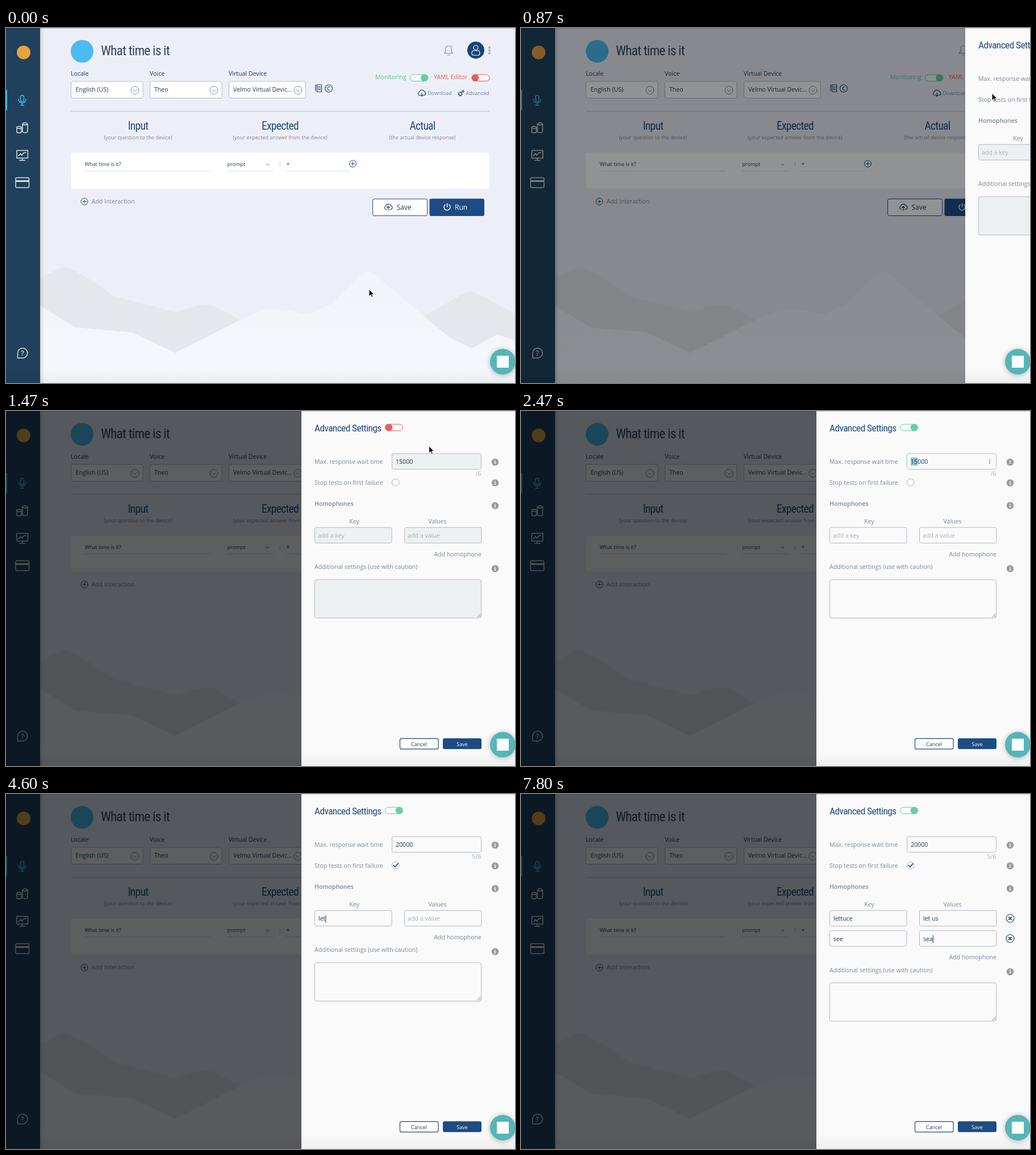
Recreate the animation shown at these times as an HTML page. Size 896x625 px, loop 8 s.

```html
<!DOCTYPE html>
<html lang="en">
<head>
<meta charset="utf-8">
<title>Advanced settings</title>
<style>
  html, body { margin: 0; width: 100%; height: 100%; overflow: hidden; background: #edeff8; }
  svg { display: block; width: 100%; height: 100%; }
  text { font: 10.6px "Open Sans", "Noto Sans", sans-serif; fill: #1c3a5e; white-space: pre; }
  .s { font-size: 9.05px; }
  .m { font-size: 12px; }
  .h { font-family: "Roboto Condensed", Roboto, sans-serif; font-stretch: 75%; letter-spacing: -.035em; font-size: 19.5px; fill: #1f4a7c; }
  .g { fill: #7c8896; }
  .p { fill: #a9b0b8; }
  .w { fill: #fff; }
  .c { text-anchor: middle; }
  .e { text-anchor: end; }
  .l { fill: none; stroke: #1f4a7c; stroke-width: 1.2; stroke-linecap: round; stroke-linejoin: round; }
  .side .l { stroke: #d7e0e8; stroke-width: 1.5; }
  .box { fill: #fff; stroke: #b4bcc6; }
  .field { fill: #fafafa; stroke: #b1b9c3; }
  .off .field { fill: #edf0f1; }
  .info text { font: bold 9px "Noto Serif", serif; fill: #fff; }
  .chat { filter: drop-shadow(0 1px 5px rgba(0, 0, 0, .28)); }
</style>
</head>
<body>
<svg viewBox="0 0 896 625">
  <defs>
    <linearGradient id="snow" x1="0" y1="0" x2="0" y2="1">
      <stop stop-color="#f0f4fb"/><stop offset="1" stop-color="#f5f9fc"/>
    </linearGradient>
    <linearGradient id="shade">
      <stop stop-opacity=".13"/><stop offset="1" stop-opacity="0"/>
    </linearGradient>
    <linearGradient id="floor" x1="0" y1="0" x2="0" y2="1">
      <stop stop-opacity="0"/><stop offset="1" stop-opacity=".05"/>
    </linearGradient>
    <g id="chev" class="l" style="stroke:#8390a0;stroke-width:1"><circle r="7"/><path d="M-3.5-1 0 2.3 3.5-1"/></g>
    <g id="plus" class="l" style="stroke-width:1"><circle r="6"/><path d="M-3 0H3M0-3V3"/></g>
    <path id="cloud" class="l" d="M-3 4.5H-4A3.2 3.2 0 0 1-4.5-1.5 4.7 4.7 0 0 1 4.2-2.2 3.4 3.4 0 0 1 4 4.5H3"/>
    <g id="info" class="info"><circle r="6.3" fill="#9a9c9f"/><text class="c" y="3.3">i</text></g>
    <g id="del" class="l"><circle r="7"/><path d="M-2-2 2 2M2-2-2 2" stroke-width="2"/></g>
  </defs>

  <rect width="896" height="625" fill="#edeff8"/>
  <path fill="#e5e7ec" d="M60 440 95 423Q103 419 111 423L140 438Q168 456 190 472L298 500 333 490Q355 485 366 489L412 514 300 590 60 540ZM735 507 805 468Q817 460 829 467L896 503V580H780Z"/>
  <path fill="url(#snow)" d="M60 489 122 527 222 536 298 572 412 514 450 498Q470 493 490 497L533 504 575 485 625 434Q636 424 649 434L735 507 781 545 820 564 860 542Q866 539 872 542L896 550V625H60Z"/>
  <rect x="60" width="7" height="625" fill="url(#shade)"/>

  <g class="side">
    <rect width="60" height="625" fill="#20405b"/>
    <circle cx="31" cy="43" r="12" fill="#e5a33f"/>
    <path fill="#42bdea" d="M0 109H2V145H0Z"/>
    <path class="l" style="stroke:#42bdea" d="M25.500 121.500a3 3 0 0 1 6 0v5a3 3 0 0 1-6 0ZM22 125.500a6.500 6.500 0 0 0 13 0M28.500 132V136M25.500 136H31.500"/>
    <path class="l" d="M29 168.500Q33.500 165 38 168.500V183Q33.500 186 29 183ZM29 169.500Q33.500 172 38 169.500M19 174.500Q23 172 27 174.500V183.500Q23 186 19 183.500ZM19 176Q23 178 27 176"/>
    <path class="l" d="M19 215.500H38.500V229H19ZM28.500 229V232.500M24 233H33.500M22 225 25.500 221 28 224 31 220 35 219"/>
    <rect class="l" x="17" y="263.500" width="23.500" height="17.500" rx="2"/>
    <path stroke="#d7e0e8" stroke-width="3" d="M17 269.500H40.500"/>
    <path class="l" d="M20.500 581V572A8.700 8.700 0 1 1 29.200 581Z"/>
    <text class="c" x="29" y="576.500" style="font-size:12px;font-weight:600;fill:#d7e0e8">?</text>
  </g>

  <circle cx="134" cy="41" r="20" fill="#4bbcf1"/>
  <text class="h" x="167" y="48" style="font-size:23.5px;fill:#34465c">What time is it</text>

  <path class="l" style="stroke:#8592a5" d="M771.500 44.500Q774 42 774 37Q774 31.500 779 31.500T784 37Q784 42 786.500 44.500ZM777 47.500H781"/>
  <circle cx="783.500" cy="33" r="3" fill="#d9cfd6"/>
  <circle cx="827" cy="39" r="15" fill="#174574"/>
  <g class="l" style="stroke:#fff"><circle cx="827" cy="34.500" r="4"/><rect x="820" y="40" width="14" height="8" rx="3.500"/></g>
  <g fill="none" stroke="#6d7f95"><circle cx="851" cy="34.500" r="1.400"/><circle cx="851" cy="39.500" r="1.400"/><circle cx="851" cy="44.500" r="1.400"/></g>

  <text x="114" y="84">Locale</text>
  <text x="253" y="84">Voice</text>
  <text x="392" y="84">Virtual Device</text>
  <rect class="box" x="114.500" y="94" width="126.500" height="29.500" rx="3"/>
  <rect class="box" x="253.500" y="94" width="126.500" height="29.500" rx="3"/>
  <rect class="box" x="392.500" y="94" width="135" height="29.500" rx="3"/>
  <text x="122.500" y="112">English (US)</text>
  <text x="261" y="112">Theo</text>
  <text x="400" y="112">Velmo Virtual Devic...</text>
  <use href="#chev" x="227" y="109.500"/><use href="#chev" x="366" y="109.500"/><use href="#chev" x="514" y="109.500"/>
  <path class="l" d="M547 100.500H545V110.500M547.500 100H555.500V112.500H547.500ZM549.500 103.500H553.500M549.500 106H553.500M549.500 108.500H553.500"/>
  <circle class="l" cx="568" cy="106.500" r="6.500"/><text class="s c" x="568" y="109.800" style="font-weight:600">C</text>

  <text x="650" y="90" style="fill:#5bc596">Monitoring</text>
  <rect x="711.500" y="82" width="31.500" height="11.500" rx="5.700" fill="#f4f8fa" stroke="#66cc9f"/><circle cx="736.500" cy="87.700" r="6.300" fill="#66cfa0"/>
  <text x="753" y="90" style="fill:#e0605f">YAML Editor</text>
  <rect x="820" y="82" width="31" height="11.500" rx="5.700" fill="#f8f4f6" stroke="#e0605f"/><circle cx="826" cy="87.700" r="6.300" fill="#e3625f"/>
  <use href="#cloud" x="732" y="114"/><path class="l" d="M732 114V120M729.800 118 732 120 734.200 118"/>
  <text class="s" x="742" y="118" style="fill:#6f8096">Download</text>
  <circle cx="799.500" cy="116" r="3" fill="none" stroke="#1f4a7c" stroke-width="2" stroke-dasharray="1.900 .5"/>
  <circle cx="804.500" cy="111.500" r="1.500" fill="none" stroke="#1f4a7c" stroke-width="1.300"/>
  <text class="s" x="809.500" y="118" style="fill:#6f8096">Advanced</text>
  <path stroke="#b9bfc9" d="M114 146.800H851"/>

  <text class="h c" x="232.500" y="179">Input</text>
  <text class="h c" x="482.500" y="179">Expected</text>
  <text class="h c" x="733" y="179">Actual</text>
  <text class="s g c" x="232.500" y="196">(your question to the device)</text>
  <text class="s g c" x="482.500" y="196">(your expected answer from the device)</text>
  <text class="s g c" x="733" y="196">(the actual device response)</text>
  <rect x="114.500" y="219.500" width="736.500" height="63" rx="4" fill="#fff"/>
  <text class="s" x="138.500" y="242.500">What time is it?</text>
  <text class="s" x="389.500" y="242.500">prompt</text>
  <text class="s" x="481" y="242.500">:</text>
  <text class="s" x="494" y="243.500">*</text>
  <path fill="none" stroke="#d5d9de" d="M138.500 251.800H360M389 251.800H471M493 251.800H605"/>
  <path fill="#c6cbd2" d="M456.500 239H464.500L460.500 243Z"/>
  <use href="#plus" x="610.500" y="239"/>
  <use href="#plus" x="138" y="305.500"/>
  <text class="g" x="150.500" y="309">Add Interaction</text>
  <rect x="645.500" y="301" width="96" height="29.500" rx="3" fill="#fff" stroke="#1f4a7c"/>
  <use href="#cloud" x="673" y="315"/><path class="l" d="M673 321V314M670.500 316.500 673 314 675.500 316.500"/>
  <text class="m" x="687.500" y="320">Save</text>
  <rect x="745.500" y="300.500" width="96.500" height="30.500" rx="3" fill="#1d4c82"/>
  <path class="l" style="stroke:#fff;stroke-width:1.500" d="M776.500 309V315M773 311A5.500 5.500 0 1 0 780 311"/>
  <text class="m w" x="790" y="320">Run</text>

  <rect id="dim" width="896" height="625" fill="#000406"/>

  <g id="panel">
    <rect width="376" height="625" fill="#fafafa"/>
    <text class="h" x="23" y="36" style="font-size:17.4px">Advanced Settings</text>
    <rect id="track" x="147.500" y="23.300" width="31" height="11.500" rx="5.700" fill="#fafafa"/>
    <circle id="knob" cy="29" r="6.300"/>
    <text class="g" x="23" y="93">Max. response wait time</text>
    <text class="g" x="23" y="129.500">Stop tests on first failure</text>
    <text class="g" x="23" y="167" style="font-weight:600">Homophones</text>
    <text class="g c" x="93" y="197.500">Key</text>
    <text class="g c" x="239.500" y="197.500">Values</text>
    <rect class="field" x="159.500" y="75" width="157" height="27.500" rx="3"/>
    <rect id="mark" x="166" y="82" width="12.300" height="14" fill="#8fc3d1"/>
    <text id="wait" x="166" y="93"></text>
    <path id="spin" fill="#808080" d="M303.200 87.500 305 85 306.800 87.500ZM303.200 90.500 305 93 306.800 90.500Z"/>
    <text id="count" class="p e" x="316.500" y="114"></text>
    <circle cx="165.800" cy="125.700" r="6.300" fill="#fff" stroke="#a4adb8"/>
    <path id="tick" class="l" style="stroke-width:1.800" d="M162.300 125.500 165 128.500 170 122.500"/>
    <use href="#info" x="341" y="90"/><use href="#info" x="341" y="126.500"/><use href="#info" x="341" y="166.500"/>
    <g id="row0"></g>
    <g id="row1" transform="translate(0 35.500)"></g>
    <g id="dels"><use href="#del" x="341" y="219"/><use href="#del" x="341" y="254.500"/></g>
    <g id="rest">
      <text class="g e" x="317" y="255.500">Add homophone</text>
      <text class="g" x="23" y="278">Additional settings (use with caution)</text>
      <use href="#info" x="341" y="277.500"/>
      <rect class="field" x="23.500" y="297" width="293" height="67.500" rx="3"/>
      <path stroke="#666" stroke-width=".9" d="M309.500 363 315.500 357M313 363 315.500 360.500"/>
    </g>
    <path id="caret" stroke="#1c3a5e" d="M0-10V3.500"/>
    <rect x="173.500" y="576.700" width="67.500" height="18.500" rx="3" fill="#fff" stroke="#1f4a7c" stroke-width="1.200"/>
    <text class="s c" x="207" y="589.500">Cancel</text>
    <rect x="249" y="576.300" width="68" height="19" rx="3" fill="#1d4c82"/>
    <text class="s c w" x="283" y="589.500">Save</text>
  </g>

  <rect y="600" width="896" height="25" fill="url(#floor)"/>
  <path stroke="#000" stroke-opacity=".2" d="M0 .5H896"/>
  <circle class="chat" cx="874.500" cy="587.500" r="22.500" fill="#55b5b9"/>
  <rect x="864" y="577" width="21" height="21" fill="#fff"/>

  <g id="cursor">
    <path id="arrow" fill="#111" stroke="#fff" stroke-width=".9" d="M0 0V12.500L3 9.800 5 14.200 7 13.300 5.200 9H9Z"/>
    <path id="beam" fill="none" stroke="#4a3038" stroke-width="1.200" d="M-3-5.500Q0-5.500 0-3.500V3.500Q0 5.500-3 5.500M3-5.500Q0-5.500 0-3.500M0 3.500Q0 5.500 3 5.500M-1.500 1.500H1.500"/>
  </g>
</svg>
<script>
const $ = id => document.getElementById(id);
const set = (id, key, value) => $(id).setAttribute(key, value);
const show = (id, on) => set(id, 'visibility', on ? 'visible' : 'hidden');

const LOOP = 8000, FPS = 15;
const slide = [896, 782, 552, 526, 521, 520];
const fade = [.12, .43, .64];

// [time, x, y]
const path = [
  [0, 639, 460], [600, 829, 115], [1200, 829, 115], [1670, 691, 28], [1800, 691, 28],
  [2070, 694, 87], [2130, 682, 87], [2730, 682, 87], [3330, 684, 124], [3600, 684, 124],
  [4000, 640, 217], [5860, 640, 217], [5930, 638, 213], [6530, 795, 251], [6600, 795, 251], [6930, 600, 242]
];

// When each letter is typed, per field
const fields = [
  { row: 0, x: 23, hint: 'add a key', text: 'lettuce', at: [4270, 4400, 4600, 4670, 4800, 4870, 5000], focus: 4000 },
  { row: 0, x: 181, hint: 'add a value', text: 'let us', at: [5270, 5330, 5400, 5470, 5530, 5730], focus: 5130 },
  { row: 1, x: 23, hint: 'add a key', text: 'see', at: [7070, 7130, 7270], focus: 6930 },
  { row: 1, x: 181, hint: 'add a value', text: 'sea', at: [7600, 7670, 7800], focus: 7470 }
];
fields.forEach((f, i) => {
  $('row' + f.row).insertAdjacentHTML('beforeend',
    `<rect class="field" x="${f.x + .5}" y="205" width="135.500" height="27.500" rx="3"/><text id="field${i}" y="223"></text>`);
});

function pointAt(t) {
  const i = path.findIndex(k => k[0] > t);
  if (i < 0) return path[path.length - 1].slice(1);
  const [t0, x0, y0] = path[i - 1], [t1, x1, y1] = path[i];
  const u = (t - t0) / (t1 - t0), s = u * u * (3 - 2 * u);
  return [x0 + (x1 - x0) * s, y0 + (y1 - y0) * s];
}

function drawFields(t) {
  let active = null;
  fields.forEach((f, i) => {
    const el = $('field' + i);
    const typed = f.text.slice(0, f.at.filter(a => a <= t).length);
    el.textContent = typed || f.hint;
    el.setAttribute('class', typed ? '' : 'p');
    el.setAttribute('x', f.x + (typed ? 7 : 6));
    if (t >= f.focus && !(f.row === 0 && t >= 6000))
      active = { x: f.x + 7.5 + (typed ? el.getComputedTextLength() : 0), y: 223 + f.row * 35.5 };
  });
  show('caret', active);
  if (active) set('caret', 'transform', `translate(${active.x} ${active.y})`);
}

function draw(time) {
  const frame = Math.floor(time * FPS / 1000 + .06);
  const t = frame * 1000 / FPS + 4;
  const within = (a, b) => t >= a && t < b;

  const step = frame - 12;
  set('dim', 'opacity', step < 0 ? 0 : fade[Math.min(step, 2)]);
  set('panel', 'transform', `translate(${step < 0 ? 896 : slide[Math.min(step, 5)]} 0)`);

  const on = t >= 1730, color = on ? '#66cfa0' : '#e3625f';
  set('panel', 'class', on ? '' : 'off');
  set('track', 'stroke', color);
  set('knob', 'fill', color);
  set('knob', 'cx', on ? 172 : 154);

  const wait = t < 2530 ? '15000' : t < 2800 ? '2000' : '20000';
  $('wait').textContent = wait;
  $('count').textContent = (t < 2530 ? '' : wait.length) + '/6';
  show('mark', within(2130, 2530));
  show('spin', within(2000, 2800));
  show('tick', t >= 3470);

  const added = t >= 6670;
  show('row1', added);
  show('dels', added);
  set('rest', 'transform', `translate(0 ${added ? 35.5 : 0})`);
  drawFields(t);

  const hidden = within(2470, 2800) || within(4200, 5930) || t >= 7070;
  const beam = within(2000, 2900) || within(3900, 5960) || t >= 6860;
  set('cursor', 'transform', `translate(${pointAt(t)})`);
  show('arrow', !hidden && !beam);
  show('beam', !hidden && beam);
}

const start = performance.now();
(function tick() {
  draw((performance.now() - start) % LOOP);
  requestAnimationFrame(tick);
})();
</script>
</body>
</html>
```
